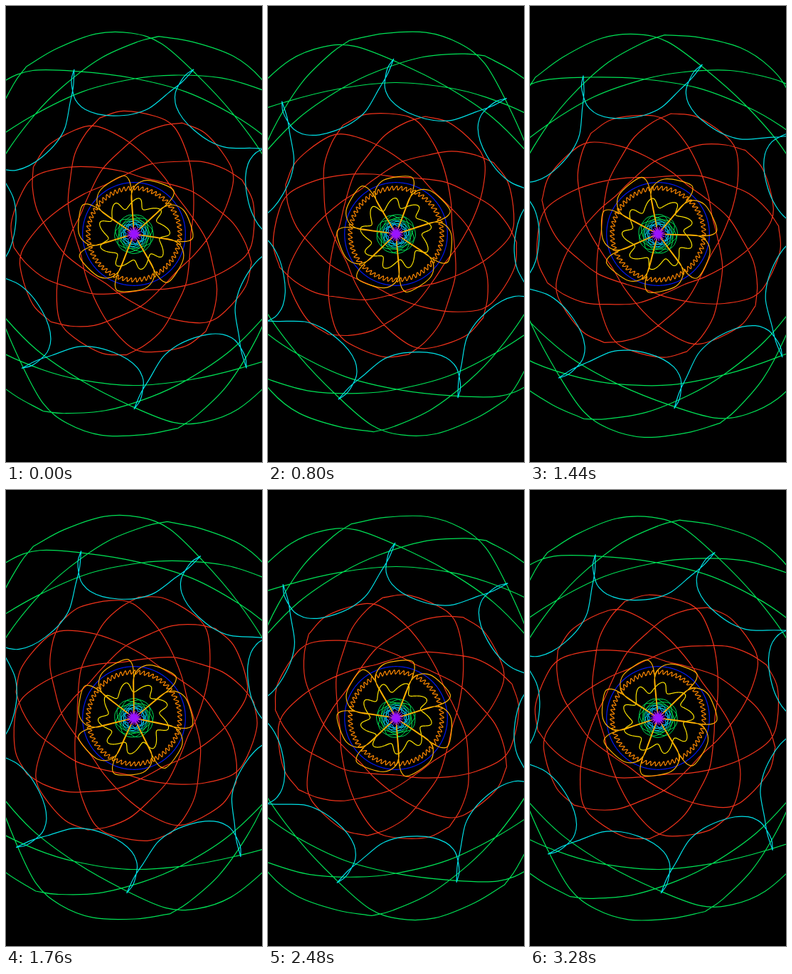
An HTML page with a canvas for the animation above (3320 ms loop, 360 by 640 pixels).

```html
<!DOCTYPE html>
<html>
<head>
<meta charset="utf-8">
<style>
  html, body { margin: 0; width: 100%; height: 100%; overflow: hidden; background: #000; }
  canvas { display: block; }
</style>
</head>
<body>
<canvas id="stage" width="360" height="640"></canvas>
<script>
const ctx = document.getElementById('stage').getContext('2d');
const LOOP = 3320, STEP = 40, RAD = Math.PI / 180;

// Arcs as [clockwise degrees, radius] pairs, repeated around the centre
const orbit = [[0, 170], [11.4, 173.3], [26.4, 168], [37, 160.5], [50, 135], [64.4, 111],
  [85, 90], [106, 80], [125, 83], [150, 101], [168.4, 120], [180, 140], [191, 157], [200, 170]];
const wide = [[0, 279.5], [10, 282], [22, 286], [32, 282], [41, 270], [54, 241], [72, 219],
  [93, 212.5], [113, 218], [127, 230], [142, 251], [154, 270], [160, 279.5]];
const thorn = [[0, 246], [-2.2, 233], [-3.6, 211], [-3.3, 200], [-1.5, 188], [3, 176],
  [10, 168.5], [19, 168], [27, 178], [34, 205], [37.6, 224], [40, 246]];
const petal = [[6, 2], [7, 22], [6.5, 45], [6.4, 65], [4.5, 77], [0, 83], [-13, 80.5],
  [-28, 77.5], [-39, 69], [-45, 56], [-46, 40], [-46, 20], [-46, 2]];

function point(deg, r) {
  return [180 + r * Math.cos(deg * RAD), 320 - r * Math.sin(deg * RAD)];
}

function spline(pts) {
  const at = i => pts[Math.max(0, Math.min(pts.length - 1, i))];
  // Tangent at a knot, one sided at the ends
  const slope = (i, k) => i === 0 || i === pts.length - 1
    ? (at(i + 1)[k] - at(i - 1)[k]) / 3
    : (at(i + 1)[k] - at(i - 1)[k]) / 6;
  ctx.moveTo(...pts[0]);
  for (let i = 0; i < pts.length - 1; i++) {
    const a = pts[i], b = pts[i + 1];
    ctx.bezierCurveTo(a[0] + slope(i, 0), a[1] + slope(i, 1),
      b[0] - slope(i + 1, 0), b[1] - slope(i + 1, 1), ...b);
  }
}

function stroke(color, width, build) {
  ctx.strokeStyle = color;
  ctx.lineWidth = width;
  ctx.beginPath();
  build();
  ctx.stroke();
}

function rosette(color, arc, count, angle, scale = 1, width = 1.2) {
  stroke(color, width, () => {
    for (let k = 0; k < count; k++) {
      spline(arc.map(([cw, r]) => point(angle + k * 360 / count - cw, r * scale)));
    }
  });
}

function wave(color, radius, depth, count, angle, lean = 0) {
  stroke(color, 1.2, () => {
    for (let d = 0; d <= 360; d += 0.5) {
      const w = Math.cos(count * d * RAD);
      ctx.lineTo(...point(angle + d - lean * w, radius + depth * w));
    }
  });
}

function star(color, count, inner, outer, angle) {
  stroke(color, 1.2, () => {
    for (let i = 0; i <= count * 2; i++) {
      ctx.lineTo(...point(angle + i * 180 / count, i % 2 ? inner : outer));
    }
  });
}

function draw(p) {
  ctx.fillStyle = '#000';
  ctx.fillRect(0, 0, 360, 640);
  const fast = -80 * p, slow = 40 * p;
  wave('#0018f0', 72.3, 0, 1, 0);
  rosette('#f0321a', orbit, 9, 26.4 + slow);
  rosette('#00e256', wide, 9, 2.8 + fast);
  rosette('#00e0e6', thorn, 9, 30 + fast);
  wave('#ff8800', 64.5, 2.8, 63, slow, 0.8);
  wave('#ffe600', 43.5, 7, 9, 5.5 + slow, 3.5);
  rosette('#00e256', wide, 9, 10 + slow, 0.096, 1);
  rosette('#00e0e6', wide, 9, 20 + fast, 0.066, 1);
  wave('#1496ff', 12.5, 1.2, 9, fast);
  rosette('#ffb000', petal, 7, -2.8 - 720 / 7 * p);
  star('#9a12ff', 18, 2, 10, slow);
  star('#9a12ff', 9, 1, 7, 10 + fast);
}

function tick() {
  const t = performance.now() % LOOP;
  draw(Math.floor(t / STEP) * STEP / LOOP);
  requestAnimationFrame(tick);
}
tick();
</script>
</body>
</html>
```
